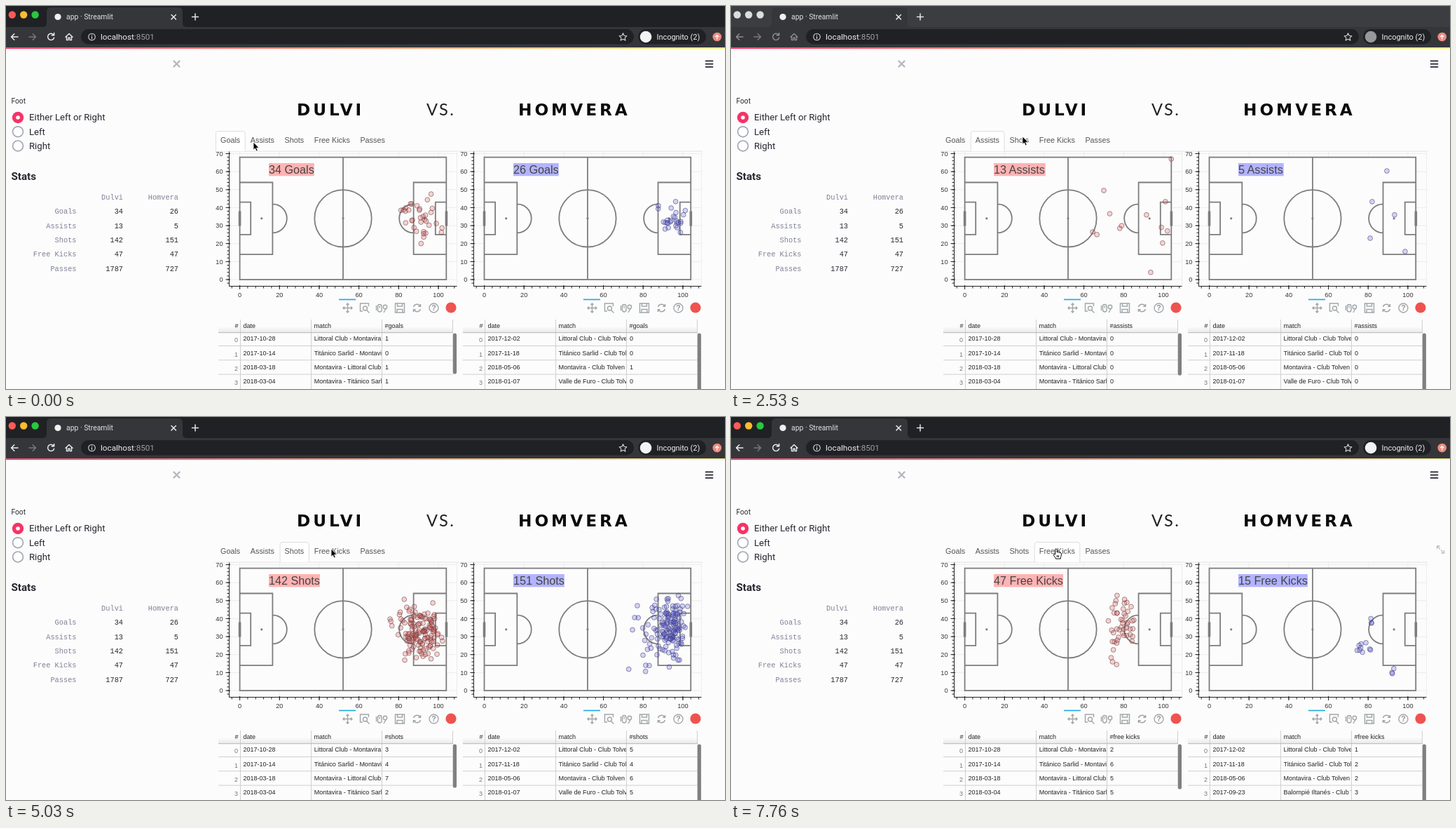
These frames come from a looping animation (1026 px wide and 546 px high, 8000 ms). An HTML page:

```html
<!DOCTYPE html>
<html lang="en">
<head>
<meta charset="utf-8">
<title>Player comparison</title>
<style>
  html, body { margin: 0; width: 100%; height: 100%; overflow: hidden; background: #fcfcfc; }
  #stage { display: block; width: 100vw; height: 100vh; }
  text { white-space: pre; font-family: "Liberation Sans", Arial, sans-serif; }
  .ui { font-family: Roboto, sans-serif; }
  .mono { font-family: "Liberation Mono", monospace; }
  .wide { font-family: "DejaVu Sans", sans-serif; font-weight: 700; letter-spacing: 4px; }
  .thin { font-family: Lato, sans-serif; letter-spacing: 2.4px; }
  .bold { font-weight: 700; }
  .end { text-anchor: end; }
  .mid { text-anchor: middle; }
  .line { fill: none; stroke: currentColor; stroke-linecap: round; stroke-linejoin: round; }
  .sharp { fill: none; stroke: currentColor; }
  .pitch { fill: none; stroke: #7d7d7d; stroke-width: 1.8; }
  .tool { fill: none; stroke: #a1a6a9; stroke-width: 1.4; }
</style>
</head>
<body>
<svg id="stage" viewBox="0 0 1026 546" preserveAspectRatio="none"></svg>
<script>
const LOOP = 8000, SHIFT = 348.9;
const PLAYERS = ['Dulvi', 'Homvera'];
const INK = '#262730', MUTED = '#7f8296';

const text = (x, y, s, size, fill, cls = '') =>
  `<text x="${x}" y="${y}" font-size="${size}" fill="${fill}" class="${cls}">${s}</text>`;
const rect = (x, y, w, h, fill, extra = '') =>
  `<rect x="${x}" y="${y}" width="${w}" height="${h}" fill="${fill}" ${extra}/>`;
const dot = (x, y, r, fill, extra = '') =>
  `<circle cx="${x}" cy="${y}" r="${r}" fill="${fill}" ${extra}/>`;
const ring = (x, y, r, cls, w = 1.4) =>
  `<circle cx="${x}" cy="${y}" r="${r}" class="${cls}" stroke-width="${w}"/>`;
const path = (d, cls, color = '', w = 1) =>
  `<path d="${d}" class="${cls}" color="${color || 'inherit'}" stroke-width="${w}"/>`;
const range = (from, to, step) =>
  Array.from({ length: Math.floor((to - from) / step) + 1 }, (_, i) => from + i * step);

const pen = document.createElement('canvas').getContext('2d');
function measure(s, size) {
  pen.font = `${size}px "Liberation Sans", Arial, sans-serif`;
  return pen.measureText(s).width;
}

// Metres on the pitch to pixels in the left plot
const px = v => +(333.6 + v * 2.834).toFixed(1);
const py = v => +(390 - v * 2.565).toFixed(1);

let seed = 4711;
const random = () => (seed = (seed * 16807) % 2147483647) / 2147483647;
const bell = () => (random() + random() + random() - 1.5) * 2;

// Bell-shaped cluster on the pitch, in metres
function cluster(count, cx, cy, spreadX, spreadY) {
  const points = [];
  while (points.length < count) {
    const x = cx + bell() * spreadX;
    if (x < 102.5) points.push([x, cy + bell() * spreadY]);
  }
  return points;
}

const STATS = [
  { name: 'Goals', counts: [34, 26], cells: ['1011', '0010'],
    points: [cluster(34, 91, 34, 6.5, 6), cluster(26, 94.5, 34, 3.6, 4)] },
  { name: 'Assists', counts: [13, 5], cells: ['0000', '0000'],
    points: [
      [[104, 67], [70, 49.5], [101, 43.3], [73, 36.6], [91.5, 36], [99, 29], [102, 27], [99.6, 20.3],
       [64.4, 26.5], [66.5, 25], [78, 28.5], [79, 30], [93.6, 4]],
      [[89.4, 60.4], [82, 43.3], [93.3, 36], [81, 23], [98.6, 15.6]]] },
  { name: 'Shots', counts: [142, 151], cells: ['3472', '5465'],
    points: [
      [...cluster(90, 93, 31, 4.5, 6), ...cluster(52, 88, 36, 6, 8)],
      [...cluster(110, 94, 34, 3.6, 8), ...cluster(41, 88, 30, 7, 9)]] },
  { name: 'Free Kicks', counts: [47, 15], cells: ['2655', '1223'],
    points: [
      cluster(47, 79, 35, 3.8, 9.5),
      [...cluster(9, 78, 23, 2.5, 2), ...cluster(3, 81, 40, 2, 2.5), ...cluster(3, 92.5, 11, .3, 2.5)]] },
];

const TAB_SIZE = 10.8;
let tabEnd = 299;
const TABS = [...STATS.map(s => s.name), 'Passes'].map(name => {
  const tab = { name, x: tabEnd, width: measure(name, TAB_SIZE) + 14 };
  tabEnd += tab.width + .6;
  return tab;
});

const MATCHES = [
  [['2017-10-28', 'Littoral Club - Montavira'], ['2017-10-14', 'Titánico Sarlid - Montavira'],
   ['2018-03-18', 'Montavira - Littoral Club'], ['2018-03-04', 'Montavira - Titánico Sarlid']],
  [['2017-12-02', 'Littoral Club - Club Tolven'], ['2017-11-18', 'Titánico Sarlid - Club Tolven'],
   ['2018-05-06', 'Montavira - Club Tolven'], ['2018-01-07', 'Valle de Furo - Club Tolven']],
];
const LATE_MATCH = ['2017-09-23', 'Balompié Iltanés - Club Tolven'];

function browser() {
  const icon = (d, w = 1.5) => path(d, 'line', '', w);
  return rect(0, 0, 1026, 31, '#202124', 'id="strip"') + rect(0, 30, 1026, 29.3, '#35363a') +
    '<path d="M52 30q6 0 6-6V8q0-6 6-6H246q6 0 6 6V24q0 6 6 6z" fill="#35363a"/>' +
    ['#fc5b57', '#fdbc2e', '#28c840'].map((c, i) =>
      dot(8.8 + 16.4 * i, 12.5, 5.2, c, `class="light" data-on="${c}"`)).join('') +
    dot(74, 15.5, 4.6, '#f1f1f1') + text(86, 19, 'app · Streamlit', 10.4, '#dfe0e2', 'ui') +
    '<g color="#e3e4e6">' + icon('M236 12.5l6.4 6.4m0-6.4l-6.4 6.4M265.5 15.5h9m-4.5-4.5v9') + '</g>' +
    '<g id="nav" color="#eceded">' +
      icon('M17 44H7.5m4.3-4.3L7.5 44l4.3 4.3') +
      icon('M68 41.2a4.6 4.6 0 1 0 .6 4M68.6 38.6v3.2h-3.4') +
      icon('M85 44.2l5-4.8 5 4.8M86.5 43.4v5.2h2.4v-3.4h2.2v3.4h2.4v-5.2', 1.4) + '</g>' +
    '<g color="#77797d">' + icon('M33 44h9.5m-4.3-4.3l4.3 4.3-4.3 4.3') + '</g>' +
    rect(107, 33, 789, 21.5, '#202124', 'rx="10.7"') +
    '<g color="#d5d7da">' + icon('M122.5 43.6v3M122.5 41.3v.2', 1.3) + ring(122.5, 44, 4.8, 'line', 1.1) +
      icon('M880.5 38.8l1.6 3.5 3.8.4-2.8 2.6.8 3.8-3.4-1.9-3.4 1.9.8-3.8-2.8-2.6 3.8-.4z', 1.1) + '</g>' +
    text(135, 48, 'localhost<tspan fill="#9ca0a5">:8501</tspan>', 11.7, '#eeeff0', 'ui') +
    rect(902, 33, 97, 21.5, '#202124', 'rx="10.7"') + dot(913, 44, 8.3, '#f1f3f4', 'id="mode"') +
    text(928.5, 48, 'Incognito (2)', 10.9, '#eeeff0', 'ui') +
    dot(1014.7, 44, 6.3, '#ee8a7e') +
    path('M1014.7 47v-5.6m-2.3 2.3l2.3-2.3 2.3 2.3', 'line', '#fff', 1.3) +
    rect(0, 59.3, 1026, 1.8, 'url(#ribbon)');
}

function sidebar() {
  const options = ['Either Left or Right', 'Left', 'Right'].map((s, i) => {
    const y = 159 + i * 20.2;
    const mark = i ? dot(17, y, 7.4, '#fff', 'stroke="#a3a8b4" stroke-width="1.7"')
                   : dot(17, y, 8.2, '#f63366') + dot(17, y, 2.8, '#fff');
    return mark + text(33, y + 4.3, s, 13.15, INK, 'ui');
  });
  const rows = [['', ...PLAYERS], ['Goals', 34, 26], ['Assists', 13, 5], ['Shots', 142, 151],
                ['Free Kicks', 47, 47], ['Passes', 1787, 727]];
  const table = rows.map((row, i) => row.map((cell, j) =>
    text([100.5, 167, 246][j], 276 + i * 20.3, cell, 10.3, i && j ? INK : MUTED, 'mono end')).join(''));
  return path('M239.5 78.5l8 8m0-8l-8 8', 'line', '#b4b7c0', 2.4) +
    text(7.5, 139, 'Foot', 10.2, INK, 'ui') + options.join('') +
    text(7.5, 248, 'Stats', 15.2, INK, 'ui bold') + table.join('');
}

function heading() {
  const [a, b] = PLAYERS.map(s => s.toUpperCase());
  return path('M998.5 78.4h10m-10 4.2h10m-10 4.2h10', 'line', INK, 1.7) +
    text(415, 156, a, 23.2, '#0b0b0b', 'wide') + text(600, 156, 'VS.', 23.6, '#222', 'thin') +
    text(731, 156, b, 23.2, '#0b0b0b', 'wide');
}

function pitch() {
  const grey = '#7d7d7d', mid = px(52), centre = py(34);
  const box = (depth, margin) => `M${px(0)} ${py(34 + margin)}H${px(depth)}V${py(34 - margin)}H${px(0)}`;
  const half = path(box(16.5, 20) + box(5.5, 9) + `M${px(16.5)} ${py(42)}a20.4 20.5 0 0 1 0 41`, 'pitch', '', 1.8) +
    rect(331.8, 292.5, 3.6, 21, grey) + dot(px(11), centre, 1.6, grey);
  return rect(px(0), py(68), 294.7, 174.4, '#fcfcfc', `stroke="${grey}" stroke-width="1.8"`) +
    path(`M${mid} ${py(68)}V${py(0)}`, 'pitch', '', 1.8) + ring(mid, centre, 40.7, 'pitch', 1.8) +
    dot(mid, centre, 1.6, grey) + half + `<g transform="translate(${2 * mid} 0) scale(-1 1)">${half}</g>`;
}

function axes() {
  const xs = range(0, 100, 20), ys = range(0, 70, 10);
  const grid = xs.map(v => `M${px(v)} 208V399`).join('') + ys.map(v => `M319 ${py(v)}H643`).join('');
  const ticks = xs.map(v => `M${px(v)} 398V404`).join('') + ys.map(v => `M313.5 ${py(v)}H320`).join('') +
    range(-4, 108, 4).map(v => `M${px(v)} 399.5v3`).join('') + range(-2, 70, 2).map(v => `M315.5 ${py(v)}h3`).join('');
  return path(grid + 'M318.5 207.5H643.5V399.5', 'sharp', '#ececec') +
    path(ticks + 'M318.5 207.5V399.5H643.5', 'sharp', '#222') +
    xs.map(v => text(px(v), 414.5, v, 9.2, '#333', 'mid')).join('') +
    ys.map(v => text(309.5, py(v) + 3.2, v, 9.2, '#333', 'end')).join('');
}

function toolbar() {
  const icon = d => path(d, 'tool');
  return rect(475, 417.6, 24, 1.7, '#26aae1') +
    icon('M481 430.5h13m-6.5-6.5v13m-2-11l2-2 2 2m-4 9l2 2 2-2m-6.5-6.5l-2 2 2 2m9-4l2 2-2 2') +
    icon('M509 435h-3.500v-11h12v4M514.5 433.5l4 4') + ring(512.5, 431, 3, 'tool') +
    rect(530.5, 425.5, 5.5, 10.5, 'none', 'rx="2.7" class="tool"') +
    icon('M533.2 427.5v3M528.5 427v7M542 432l-3 5') + ring(541, 429, 2.7, 'tool') +
    icon('M555.5 424h13v13h-13zM558.5 424v4h7v-4M558 437v-4.5h8v4.5') +
    icon('M581.5 429a5.2 5.2 0 0 1 9.6-1m.5-3v3.3h-3.3M591.5 432a5.2 5.2 0 0 1-9.6 1m-.5 3v-3.3h3.3') +
    ring(610.5, 430.5, 6.5, 'tool') + text(610.5, 434.2, '?', 10.5, '#8f9497', 'mid bold') +
    dot(635, 430, 7.6, '#ef5350');
}

function table(stat, who, index) {
  const rows = [...MATCHES[who]];
  if (who && index === 3) rows[3] = LATE_MATCH;
  const ink = '#222', y = i => +(477.3 + i * 20.3).toFixed(1);
  const lines = range(0, 2, 1).map(i => `M303 ${y(i) + 7.2}H637.5`).join('') +
    'M334.5 447V546M435.5 447V546M536.5 447V546M637.5 447V466';
  return rect(303, 457, 335, 8.5, 'url(#shade)') + path(lines, 'sharp', '#cfcfcf') +
    path('M303 465.7H638', 'sharp', '#b5b5b5') +
    text(331.5, 458.5, '#', 9, ink, 'end') + text(338.5, 458.5, 'date', 9, ink) +
    text(439.5, 458.5, 'match', 9, ink) + text(540.5, 458.5, '#' + stat.name.toLowerCase(), 9, ink) +
    rows.map(([date], i) => text(331, y(i) + 1.9, i, 9, '#777', 'end') + text(338.5, y(i), date, 9, ink) +
      text(541, y(i), stat.cells[who][i], 9, ink)).join('') +
    '<svg x="439" y="466" width="97" height="80">' +
    rows.map(([, match], i) => text(.7, y(i) - 466, match, 9, ink)).join('') + '</svg>' +
    rect(637.7, 466.5, 5.3, who ? 84 : 58 + index * 2, '#808080', 'rx="2.6"');
}

function view(stat, index) {
  const styles = [['rgba(230,85,85,.26)', 'rgba(95,65,65,.55)', '#ffb3b3'],
                  ['rgba(90,90,230,.26)', 'rgba(65,65,110,.55)', '#b3b3ff']];
  const { x, width } = TABS[index];
  const tab = `<path d="M${x + .5} 207V181.5q0-3 3-3H${x + width - 3}q3 0 3 3V207" fill="#fff" stroke="#dedede"/>`;
  const sides = styles.map(([fill, stroke, mark], who) => {
    const label = `${stat.counts[who]} ${stat.name}`;
    const marks = stat.points[who].map(([a, b]) => dot(px(a), py(b), 3.4, fill)).join('');
    return `<g transform="translate(${who * SHIFT} 0)"><g stroke="${stroke}">${marks}</g>` +
      rect(375, 224, measure(label, 16.2), 18.3, mark) + text(375, 238.7, label, 16.2, '#444') +
      table(stat, who, index) + '</g>';
  });
  return `<g class="view">${tab}${sides.join('')}</g>`;
}

const stage = document.getElementById('stage');
const plot = axes() + pitch() + toolbar();
stage.innerHTML = `<defs>
  <linearGradient id="ribbon"><stop stop-color="#f63366"/><stop offset="1" stop-color="#fffd80"/></linearGradient>
  <linearGradient id="shade" x2="0" y2="1"><stop stop-color="#fcfcfc"/><stop offset="1" stop-color="#e9e9e9"/></linearGradient>
  </defs>` + rect(0, 0, 1026, 546, '#fcfcfc') + browser() + sidebar() + heading() +
  path('M299 207H994', 'sharp', '#e6e6e6') +
  `<g>${plot}</g><g transform="translate(${SHIFT} 0)">${plot}</g>` + STATS.map(view).join('') +
  TABS.map(t => text(t.x + 7, 194.8, t.name, TAB_SIZE, '#555')).join('') +
  `<g id="expand">${path('M1007.5 187.5v-3.5h3.5m-3.5 0l4 4M1017.5 190.5v3.5h-3.5m3.5 0l-4-4', 'line', '#b9bcc3', 1.3)}</g>` +
  `<g id="cursor"><path d="M0 0V11.2l2.5-2.3 1.7 4 2-.8-1.7-3.9H8z" fill="#000" stroke="#fff" stroke-width=".8"/>
   <path d="M-1.5 8V1.3a1.3 1.3 0 0 1 2.6 0V5c.6-.8 2-.7 2.3.3.7-.6 1.9-.4 2.2.5.9-.4 1.9.2 1.9 1.2 0 2.6-.8 4-1.2 5.2v1.9H-.6C-1 12.3-3.3 10-3.7 8.6-4 7.4-2.6 6.8-1.5 8zM1.4 9v3M3.4 9v3" fill="#fff" stroke="#000"/></g>`;

// Each step changes part of the state and holds until the next
const STEPS = [
  [0, { active: 1, tab: 0, hand: 0, x: 353, y: 194, expand: 0 }],
  [210, { hand: 1, y: 195 }],
  [440, { y: 193, expand: .5 }],
  [650, { expand: 1 }],
  [860, { tab: 1 }],
  [1070, { hand: 0, y: 192 }],
  [1280, { active: 0 }],
  [1490, { x: 416, y: 196 }],
  [1700, { x: 474, expand: 0 }],
  [2110, { x: 458, y: 192 }],
  [2320, { x: 431, y: 187 }],
  [2530, { x: 416, y: 186 }],
  [3370, { active: 1 }],
  [3580, { hand: 1 }],
  [3990, { tab: 2, expand: 1 }],
  [4410, { active: 0, hand: 0, x: 419, y: 187 }],
  [4610, { x: 464, y: 188 }],
  [4820, { expand: 0 }],
  [5030, { active: 1 }],
  [5660, { active: 0 }],
  [6080, { active: 1 }],
  [7550, { hand: 1 }],
  [7760, { tab: 3, expand: 1 }],
];
const $ = s => stage.querySelector(s), $$ = s => [...stage.querySelectorAll(s)];
const views = $$('.view'), lights = $$('.light'), cursor = $('#cursor');
const strip = $('#strip'), nav = $('#nav'), mode = $('#mode'), expand = $('#expand');
const show = (el, on) => { el.style.display = on ? '' : 'none'; };

function draw(time) {
  const s = Object.assign({}, ...STEPS.filter(([at]) => at <= time).map(([, change]) => change));
  views.forEach((v, i) => show(v, i === s.tab));
  lights.forEach(l => l.setAttribute('fill', s.active ? l.dataset.on : '#dcdddd'));
  strip.setAttribute('fill', s.active ? '#202124' : '#3c3d41');
  nav.setAttribute('color', s.active ? '#eceded' : '#8b8d91');
  mode.setAttribute('fill', s.active ? '#f1f3f4' : '#96989c');
  expand.setAttribute('opacity', s.expand);
  cursor.setAttribute('transform', `translate(${s.x} ${s.y})`);
  [...cursor.children].forEach((c, i) => show(c, i === s.hand));
}

const start = performance.now();
function tick() {
  draw((performance.now() - start) % LOOP);
  requestAnimationFrame(tick);
}
tick();
</script>
</body>
</html>
```
